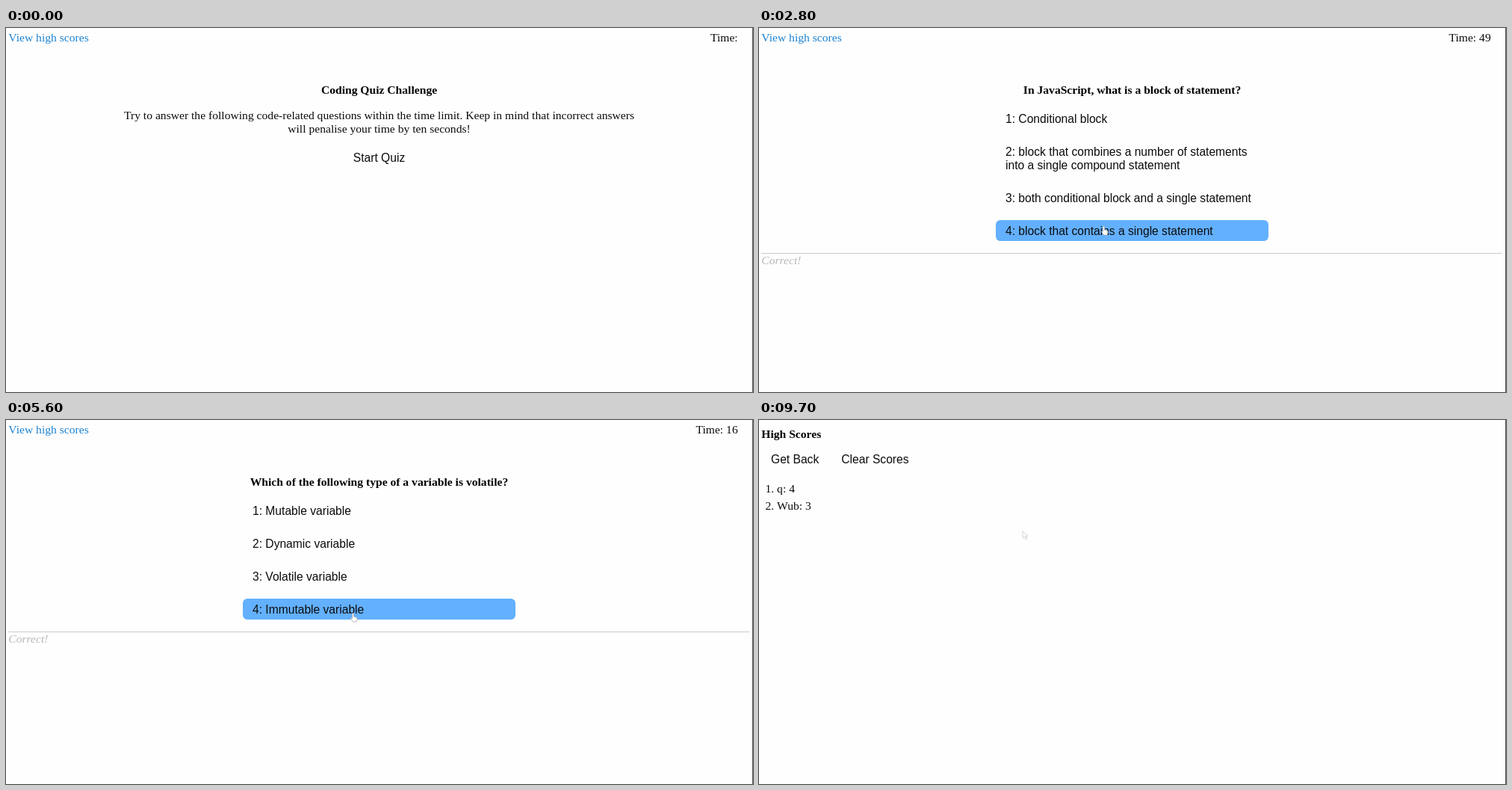
Animation, 1000 px wide and 487 px high, one loop 9.9 s. Source, as an HTML page with a canvas:

```html
<!DOCTYPE html>
<html lang="en">
<head>
<meta charset="utf-8">
<title>Coding quiz</title>
<style>
html, body { margin: 0; width: 100%; height: 100%; overflow: hidden; background: #fefefe; }
canvas { display: block; width: 1000px; height: 487px; }
</style>
</head>
<body>
<canvas id="stage" width="1000" height="487"></canvas>
<script>
const ctx = document.getElementById('stage').getContext('2d');
const LOOP = 9900, STEP = 100, MID = 499.5;
const SERIF = '15.62px "Liberation Serif", "Times New Roman", serif';
const SANS = '15.62px "Liberation Sans", Arial, sans-serif';
const INK = '#0c0c0c', BLUE = '#63b0ff';

const questions = [
  { from: 800, title: 'Which type of JavaScript language is',
    options: ['Object-Oriented', 'Object-Based', 'Assembly-language', 'High-level'] },
  { from: 2100, title: 'In JavaScript, what is a block of statement?',
    options: ['Conditional block',
      'block that combines a number of statements\ninto a single compound statement',
      'both conditional block and a single statement',
      'block that contains a single statement'] },
  { from: 2900, title: 'The "function" and " var" are known as:',
    options: ['Keywords', 'Data types', 'Declaration statements', 'Prototypes'] },
  { from: 4400, title: 'Which of the following type of a variable is volatile?',
    options: ['Mutable variable', 'Dynamic variable', 'Volatile variable', 'Immutable variable'] },
  { from: 6200, title: 'In the JavaScript, which one of the following is not considered as an error:',
    options: ['Syntax error', 'Missing of semicolons', 'Division by zero', 'Missing of Bracket'] }
];
const FEEDBACK_FROM = 1500, END_FROM = 7600, SCORES_FROM = 8900;

// [time, value]
const clock = [[0, ''], [2100, ' 59'], [2500, ' 49'], [3900, ' 38'], [4700, ' 27'],
  [5100, ' 16'], [6900, ' 5'], [7900, ' 4']];
// [time, x, y]
const path = [[400, 610, 181], [600, 490, 175], [800, 470, 174], [1200, 464, 252],
  [2500, 464, 252], [2800, 463, 271], [2900, 464, 272], [3900, 464, 272], [4400, 466, 264],
  [7800, 466, 264], [8100, 540, 176], [8900, 540, 172], [9500, 356, 154]];

const latest = (list, t, key) => list.filter(item => item[key] <= t).pop();

function text(str, x, y, { font = SERIF, style = '', align = 'left', color = INK } = {}) {
  ctx.font = style + ' ' + font;
  ctx.textAlign = align;
  ctx.fillStyle = color;
  ctx.fillText(str, x, y);
}

function box(x, y, w, h) {
  ctx.fillStyle = BLUE;
  ctx.beginPath();
  ctx.roundRect(x, y, w, h, 6);
  ctx.fill();
}

function cursorAt(t) {
  const next = path.findIndex(p => p[0] > t);
  if (next === 0) return null;
  if (next < 0) return path[path.length - 1].slice(1);
  const [t0, x0, y0] = path[next - 1], [t1, x1, y1] = path[next];
  const k = (t - t0) / (t1 - t0);
  return [x0 + (x1 - x0) * k, y0 + (y1 - y0) * k];
}

function drawCursor([x, y], arrow) {
  ctx.save();
  ctx.translate(x, y);
  const shape = new Path2D(arrow
    ? 'M-3-5V4L-1 2L1 5.5L2.5 5L1 1.5H4Z'
    : 'M-2.5-5Q-1.5-6.5-.5-5V-1L3 0Q4.5.5 4 3L3 6H-1.5L-4.5 1.5Q-4 0-2.5 1.5Z');
  ctx.fillStyle = '#fff';
  ctx.strokeStyle = arrow ? '#c8c8c8' : '#aaa';
  ctx.lineWidth = 0.8;
  ctx.fill(shape);
  ctx.stroke(shape);
  ctx.restore();
}

function drawHeader(t) {
  text('View high scores', 3.3, 18, { color: '#1b82d2' });
  text('Time:' + latest(clock, t, 0)[1], 979.7, 18, { align: 'right' });
}

function heading(str) {
  text(str, MID, 88, { style: 'bold', align: 'center', color: '#000' });
}

function drawStart(cursor) {
  heading('Coding Quiz Challenge');
  const center = { align: 'center' };
  text('Try to answer the following code-related questions within the time limit. Keep in mind that incorrect answers', MID, 122, center);
  text('will penalise your time by ten seconds!', MID, 140, center);
  if (cursor && cursor[0] < 548) box(451, 159, 97, 28);
  text('Start Quiz', MID, 178.5, { font: SANS, align: 'center' });
}

function drawQuestion(t, cursor) {
  const { title, options } = latest(questions, t, 'from');
  heading(title);
  let top = 107;
  options.forEach((option, i) => {
    const lines = (i + 1 + ': ' + option).split('\n');
    const height = 10 + 18 * lines.length;
    const inside = cursor[1] >= top && cursor[1] < top + height;
    const kept = t >= 2500 && i === options.length - 1;
    if (inside || kept) box(317, top, 365, height);
    lines.forEach((line, n) => text(line, 330, top + 19.7 + 18 * n, { font: SANS }));
    top += height + 16;
  });
  if (t >= FEEDBACK_FROM) {
    ctx.fillStyle = '#cbcbcb';
    ctx.fillRect(3, top, 992, 1);
    text('Correct!', 3.3, top + 15, { style: 'italic', color: '#b9b9b9' });
  }
}

function drawEnd(t) {
  heading('All done!');
  text('Your final score is 4', MID, 122, { align: 'center' });
  text('Enter initials:' + (t >= 8400 ? ' q' : ''), 380, 178);
  text('Submit', 530, 178.5, { font: SANS });
}

function drawScores() {
  text('High Scores', 3.3, 24, { style: 'bold', color: '#000' });
  text('Get Back', 16, 58, { font: SANS });
  text('Clear Scores', 110.3, 58, { font: SANS });
  text('1. q: 4', 8.5, 96.5);
  text('2. Wub: 3', 8.5, 119.5);
}

function render(now) {
  const t = Math.floor(now % LOOP / STEP) * STEP;
  const cursor = cursorAt(t);
  ctx.fillStyle = '#fefefe';
  ctx.fillRect(0, 0, 1000, 487);
  ctx.fillStyle = '#555';
  ctx.fillRect(999, 0, 1, 487);

  if (t >= SCORES_FROM) drawScores();
  else {
    drawHeader(t);
    if (t < questions[0].from) drawStart(cursor);
    else if (t < END_FROM) drawQuestion(t, cursor);
    else drawEnd(t);
  }
  if (cursor) drawCursor(cursor, t < 600 || t >= END_FROM);
}

let start;
function tick(now) {
  start ??= now;
  render(now - start);
  requestAnimationFrame(tick);
}
render(0);
requestAnimationFrame(tick);
</script>
</body>
</html>
```
